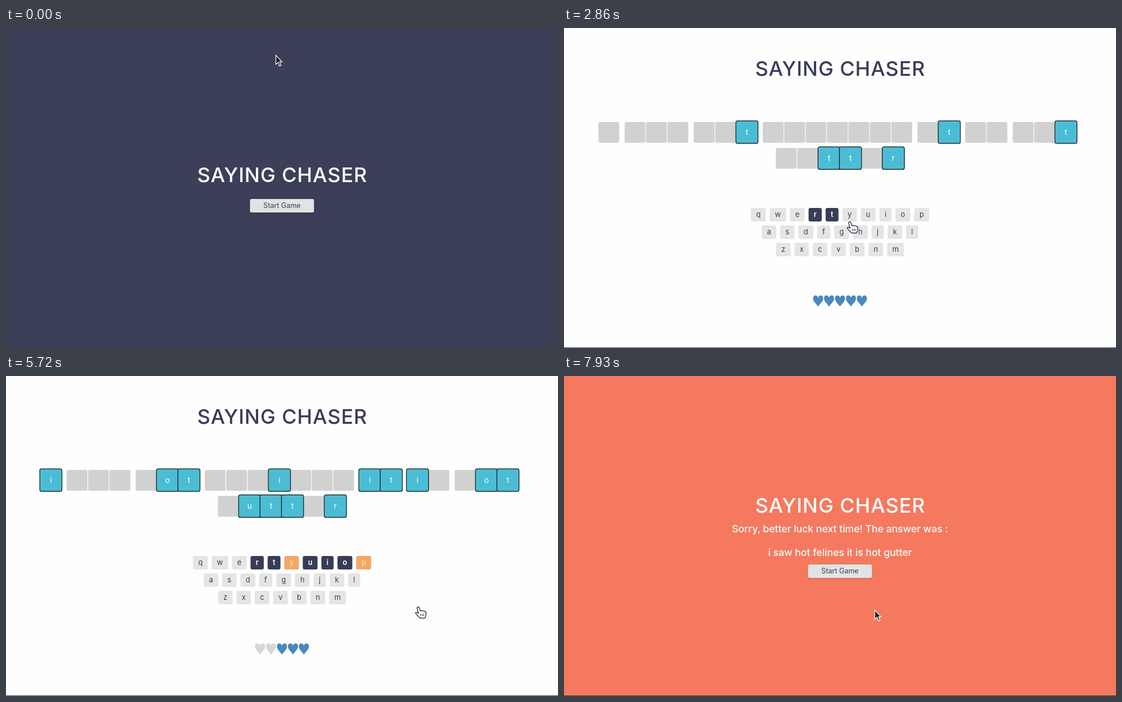
Write an HTML page that moves like this. It is 983 by 569 pixels and loops after 8000 ms.

```html
<!DOCTYPE html>
<html lang="en">
<head>
<meta charset="utf-8">
<title>Saying Chaser</title>
<style>
html, body { margin: 0; height: 100%; overflow: hidden; background: #fefefe; }
svg { display: block; width: 100vw; height: 100vh; }
text { font-family: Inter, "Open Sans", sans-serif; text-anchor: middle; }
.button { filter: drop-shadow(0 1px 2px #0002); }
</style>
</head>
<body>
<svg id="stage" viewBox="0 0 983 569"></svg>
<script>
const LOOP = 8000, STEP = 130, START = 650, MID = 491.5;
const NAVY = '#393c57', BLANK = '#d1d1d1', LIT = '#4abdd4', MISS = '#f5a765';
const LINES = ['i saw hot felines it is hot ', 'gutter'];
const ANSWER = LINES.join('');

// When each key is pressed; the last miss ends the game
const presses = { t: 1820, r: 2340, y: 3120, u: 3510, p: 4160, i: 4420, o: 4940, l: 6370, k: 6760, j: 7150, m: 7670 };
const END = presses.m;
const pressed = (c, t) => t >= presses[c];

// Key widths follow their letters; every row is centred
const pen = document.createElement('canvas').getContext('2d');
pen.font = '13px Inter, "Open Sans", sans-serif';
const keys = ['qwertyuiop', 'asdfghjkl', 'zxcvbnm'].flatMap((row, r) => {
  const gap = 6.9;
  const list = [...row].map(c => ({ c, w: pen.measureText(c).width + 18.6, y: 319.3 + r * 31 }));
  let x = MID - (list.reduce((sum, k) => sum + k.w + gap, 0) - gap) / 2;
  for (const k of list) { k.x = x; x += k.w + gap; }
  return list;
});

// Pointer stops: time, x, y. It also rests briefly on each pressed key.
const stops = [
  [0, 480, 48], [260, 482, 320], [2860, 510, 345], [4030, 657, 343],
  [5720, 735, 411], [5980, 735, 411], [7540, 580, 416], [7930, 553, 416]
];
for (const { c, x, y, w } of keys) {
  if (!presses[c]) continue;
  for (const wait of [0, STEP]) stops.push([presses[c] + wait, x + w / 2 + 1, y + 10.5]);
}
stops.sort((a, b) => a[0] - b[0]);

const rect = (x, y, w, h, fill, rest = 'rx="3"') =>
  `<rect x="${x}" y="${y}" width="${w}" height="${h}" fill="${fill}" ${rest}/>`;
const label = (s, x, y, size, fill, rest = '') =>
  `<text x="${x}" y="${y}" font-size="${size}" fill="${fill}" ${rest}>${s}</text>`;
const title = (y, fill) => label('SAYING CHASER', MID + 0.5, y, 36, fill, 'font-weight="500" letter-spacing=".9"');
const message = (s, y) => label(s, MID, y, 17.6, '#fff', 'font-weight="500"');
const button = y => rect(434.5, y, 114, 24, '#e2e3e4', 'rx="3" class="button"') +
  label('Start Game', MID, y + 16.2, 12.5, NAVY);

function tiles(t, drop) {
  const pitch = 38.15, space = 8.5;
  const advance = c => c === ' ' ? space : pitch;
  let blank = '', lit = '';
  LINES.forEach((line, row) => {
    let x = MID - [...line].reduce((sum, c) => sum + advance(c), 0) / 2 + 0.2;
    const y = row ? 212.5 + drop : 167;
    for (const c of line) {
      if (pressed(c, t)) {
        lit += rect(x - 1.2, y - 1.8, 39.4, 40, LIT, 'rx="3" stroke="#111" stroke-width="1.2"') +
          label(c, x + 18.5, y + 23, 14, '#fff');
      } else if (c !== ' ') blank += rect(x, y, 37, 37, BLANK);
      x += advance(c);
    }
  });
  return blank + lit;
}

function keyboard(t, drop) {
  return keys.map(({ c, x, y, w }) => {
    const on = pressed(c, t), hit = ANSWER.includes(c);
    return rect(x, y + drop, w, 24, on ? (hit ? NAVY : MISS) : '#e5e5e5') +
      label(c, x + w / 2, y + drop + 16, 13, on ? (hit ? '#fff' : '#fde3cb') : NAVY,
        on && hit ? 'font-weight="600"' : '');
  }).join('');
}

function hearts(t, drop) {
  const lost = Object.keys(presses).filter(c => pressed(c, t) && !ANSWER.includes(c)).length;
  return [0, 1, 2, 3, 4].map(i =>
    `<path transform="translate(${MID + (i - 2) * 19.5} ${484.5 + drop})" fill="${i < lost ? '#d6d6d6' : '#4a87bd'}"
      d="M0 10C-4 4-9 1-9-4.5C-9-11-1.5-11.5 0-5.5C1.5-11.5 9-11 9-4.5C9 1 4 4 0 10Z"/>`).join('');
}

function pointer(t) {
  const n = stops.findIndex(s => s[0] > t);
  const b = stops.at(n), a = n < 0 ? b : stops[n - 1];
  const k = a === b ? 0 : (t - a[0]) / (b[0] - a[0]);
  const ease = k * k * (3 - 2 * k);
  const [x, y] = [1, 2].map(i => a[i] + (b[i] - a[i]) * ease);
  const shape = t < 260 || t >= END
    ? '<path d="M.5.5V16.5L4.5 13 7 19.5 9.7 18.5 7.2 12H11.5Z" fill="#111" stroke="#eee" stroke-width="1.4"/>'
    : `<path d="M-3 2C-3-1 1-1 1 1.5L3 7C4 5.5 6 5.5 7 7 8 6 10 6 10.5 8 12 7 13 8 13 10L12.5 15 11 19.5H2L-1 16-5.5 11.5C-6.5 9.5-4 8.5-2.5 10L-.5 11Z"
        fill="#fff" stroke="#333645" stroke-width="1.4" stroke-linejoin="round"/>
       <path d="M3.5 12V16M6 12V16M8.5 12V16" stroke="#333645"/>`;
  return `<g transform="translate(${x} ${y})">${shape}</g>`;
}

function screen(t) {
  const fill = color => rect(0, 0, 983, 569, color, '');
  if (t < START) return fill('#3c3f58') + title(273.5, '#fff') + button(304);
  if (t >= END) {
    return fill('#f5795f') + title(242.5, '#fff') +
      message('Sorry, better luck next time! The answer was :', 278) +
      message(ANSWER, 319.5) + button(335);
  }
  // The lower rows settle slightly once the first letter shows
  const drop = pressed('t', t) ? 0.7 : 0;
  return fill('#fefefe') + title(85, NAVY) + tiles(t, drop) + keyboard(t, drop) + hearts(t, drop);
}

const stage = document.getElementById('stage');
let shown = -1;
function tick() {
  const step = Math.floor(performance.now() % LOOP / STEP);
  if (step !== shown) {
    shown = step;
    const t = step * STEP;
    stage.innerHTML = screen(t) + rect(0, 568, 983, 1, '#3a3a3e', '') + pointer(t);
  }
  requestAnimationFrame(tick);
}
tick();
</script>
</body>
</html>
```
